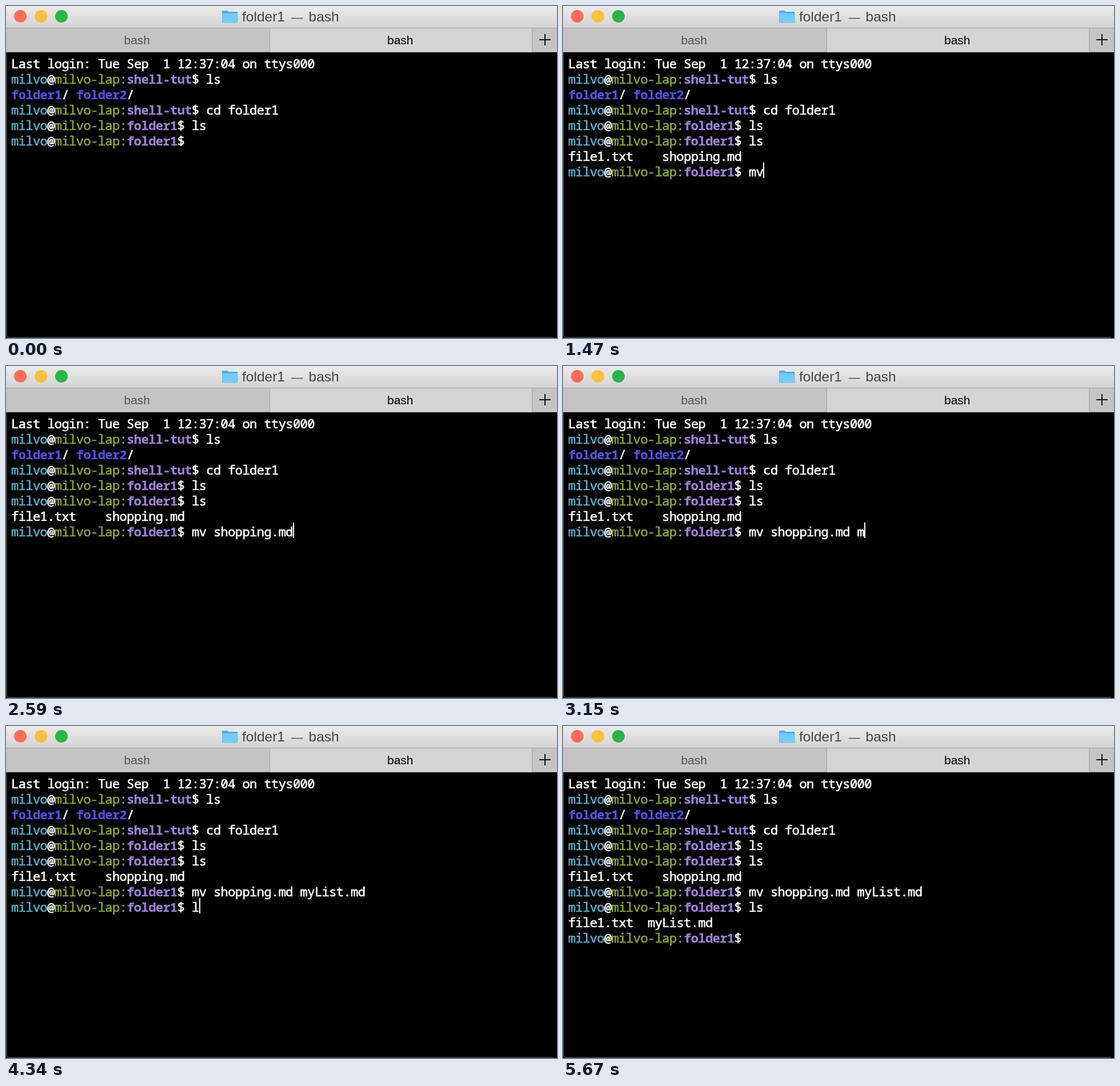
Recreate the animation shown at these times as an HTML page. Size 964 by 581 pixels, loop 5740 ms.

```html
<!DOCTYPE html>
<html lang="en">
<head>
<meta charset="utf-8">
<title>Terminal</title>
<style>
  html, body { margin: 0; width: 100%; height: 100%; overflow: hidden; background: #000; }
  svg { display: block; width: 964px; height: 581px; }
  text { white-space: pre; }
  .ui { font-family: "Liberation Sans", Arial, sans-serif; font-size: 21px; }
  .title { font-size: 24.5px; fill: #464646; }
  .term { font: 22px "Noto Sans Mono", monospace; letter-spacing: -.56px; }
  .term text { fill: currentColor; stroke: currentColor; stroke-width: .7px; color: #fff; }
  .term .user { color: #60aac6; }
  .term .host { color: #87a53a; }
  .term .dir { color: #9a80d0; }
  .term .folder { color: #5252dc; }
  .term .dir, .term .folder, .term .at { font-weight: 700; stroke-width: .3px; }
</style>
</head>
<body>
<svg viewBox="0 0 964 581">
  <defs>
    <linearGradient id="bar" x2="0" y2="1">
      <stop stop-color="#ebebeb"/>
      <stop offset="1" stop-color="#d3d3d3"/>
    </linearGradient>
  </defs>

  <rect width="964" height="581"/>
  <rect width="964" height="38" fill="url(#bar)"/>
  <rect y="38" width="964" height="43" fill="#c4c4c4"/>
  <rect x="462" y="39" width="458" height="42" fill="#d4d4d4"/>
  <path d="M0 38.5H964M461.5 38V80M920.5 38V80M0 80.5H462M920 80.5H964" stroke="#a6a6a6"/>

  <circle cx="25" cy="18" r="11" fill="#ff6d5a"/>
  <circle cx="61" cy="18" r="11" fill="#ffbf3f"/>
  <circle cx="97" cy="18" r="11" fill="#2cb34b"/>

  <path d="M378 28V9.5Q378 8 379.500 8H387L389.500 10H404Q405.500 10 405.500 11.500V28Q405.500 29.500 404 29.500H379.500Q378 29.500 378 28Z" fill="#55aee2"/>
  <path d="M378.500 13H405V28Q405 29 404 29H379.500Q378.500 29 378.500 28Z" fill="#74cbfa"/>

  <g class="ui">
    <g class="title">
      <text x="413" y="27">folder1</text>
      <text x="499.500" y="27" font-size="20">—</text>
      <text x="529.500" y="27">bash</text>
    </g>
    <text x="206.500" y="67" fill="#555">bash</text>
    <text x="667" y="67">bash</text>
  </g>
  <path d="M933 59H953M943 49V69" stroke="#111" stroke-width="2"/>

  <path d="M1 81V575Q1 580 6 580H959" fill="none" stroke="#444" stroke-width="1.5"/>
  <g class="term" id="term"></g>
</svg>

<script>
const LOOP = 5740;
const CELL = 12.64, LINE = 27, LEFT = 9, TOP = 85;
const PROMPT_COLS = 25;
const term = document.getElementById('term');

function add(name, attrs, parent = term) {
  const el = document.createElementNS(term.namespaceURI, name);
  for (const key in attrs) el.setAttribute(key, attrs[key]);
  return parent.appendChild(el);
}

// Hard-cut animation from a list of [time, style] steps
function play(el, steps) {
  const frames = steps.map(([time, style]) => ({ ...style, offset: time / LOOP, easing: 'step-end' }));
  frames.push({ ...steps.at(-1)[1], offset: 1 });
  el.animate(frames, { duration: LOOP, iterations: Infinity });
}

function write(col, row, str, cls = '', time = 0) {
  const el = add('text', { x: LEFT + col * CELL, y: TOP + 23.5 + row * LINE, class: cls });
  el.textContent = str;
  if (time) play(el, [[0, { opacity: 0 }], [time, { opacity: 1 }]]);
}

function prompt(row, dir, time = 0) {
  let col = 0;
  const parts = [['milvo', 'user'], ['@', 'at'], ['milvo-lap:', 'host'], [dir, 'dir'], ['$', '']];
  for (const [str, cls] of parts) {
    write(col, row, str, cls, time);
    col += str.length;
  }
}

const caret = [];
const moveCaret = (time, col, row, on = 1) => caret.push([time, {
  transform: `translate(${Math.round(LEFT + col * CELL)}px, ${TOP + row * LINE}px)`,
  opacity: on
}]);

function type(row, str, times) {
  [...str].forEach((char, i) => {
    write(PROMPT_COLS + i, row, char, '', times[i]);
    moveCaret(times[i], PROMPT_COLS + i + 1, row);
  });
}

function newPrompt(row, time) {
  prompt(row, 'folder1', time);
  moveCaret(time, PROMPT_COLS, row);
}

// Scrollback
write(0, 0, 'Last login: Tue Sep  1 12:37:04 on ttys000');
prompt(1, 'shell-tut');
write(27, 1, 'ls');
write(0, 2, 'folder1', 'folder');
write(7, 2, '/');
write(9, 2, 'folder2', 'folder');
write(16, 2, '/');
prompt(3, 'shell-tut');
write(27, 3, 'cd folder1');
prompt(4, 'folder1');
write(25, 4, 'ls');
prompt(5, 'folder1');

// Session
moveCaret(0, PROMPT_COLS, 5, 0);
type(5, 'ls', [70, 140]);
write(0, 6, 'file1.txt    shopping.md', '', 280);
newPrompt(7, 280);
moveCaret(770, PROMPT_COLS, 7, 0);
type(7, 'mv shopping.md myList.md', [
  1330, 1400, 1540, 1610, 1680, 1750, 1820, 1890, 1960, 2030, 2170, 2310,
  2450, 2520, 2660, 3080, 3220, 3360, 3430, 3500, 3570, 3710, 3850, 3920
]);
newPrompt(8, 4130);
type(8, 'ls', [4340, 4410]);
write(0, 9, 'file1.txt  myList.md', '', 4620);
newPrompt(10, 4620);
moveCaret(5180, PROMPT_COLS, 10, 0);

play(add('rect', { width: 2, height: 27, fill: '#fff' }), caret);
</script>
</body>
</html>
```
